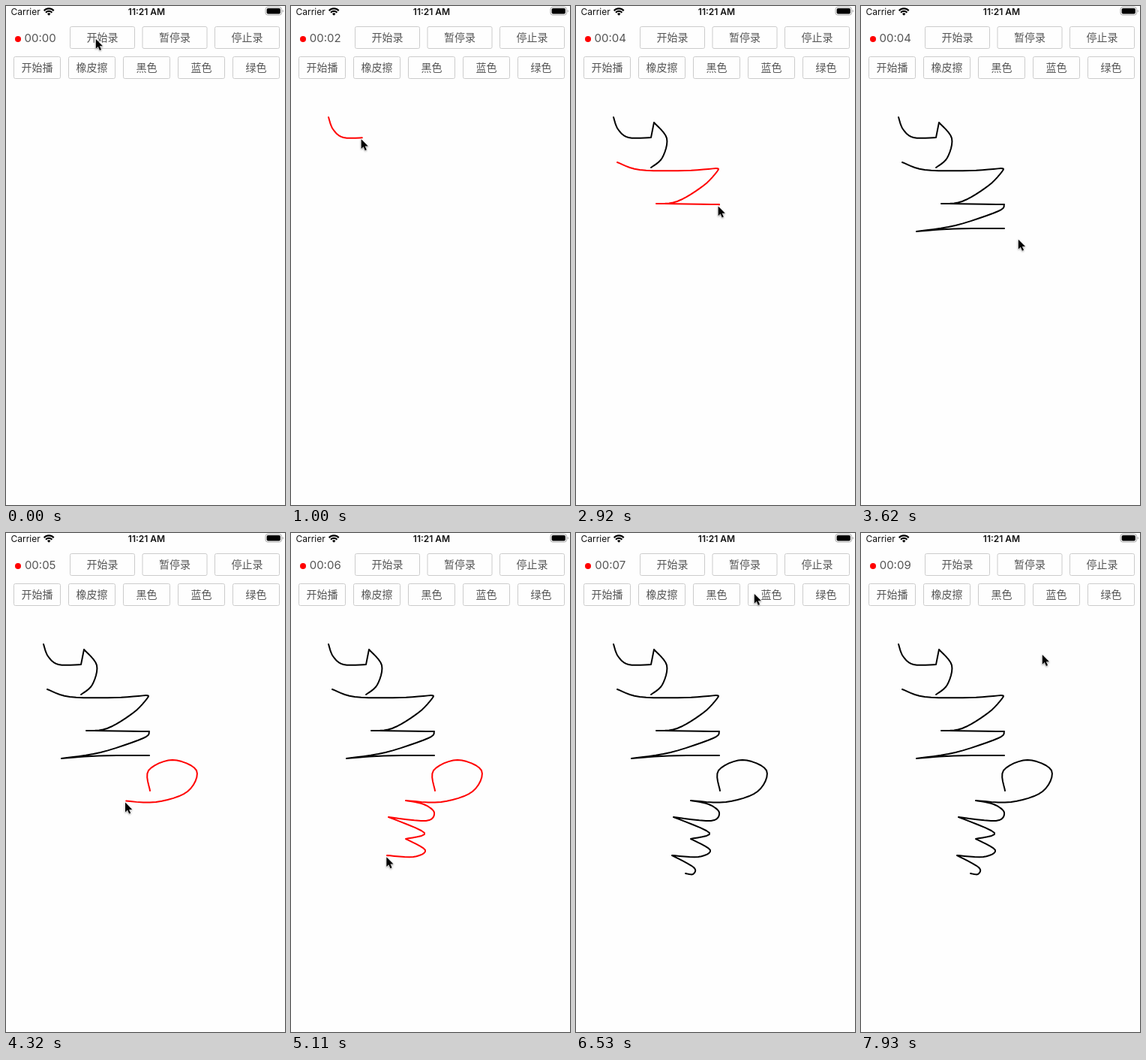
Recreate the animation shown at these times as an HTML page. Size 372x664 px, loop 7.99 s.

```html
<!DOCTYPE html>
<html lang="zh">
<head>
<meta charset="utf-8">
<style>
html, body { margin: 0; width: 100%; height: 100%; overflow: hidden; background: #fefefe; }
svg { display: block; width: 372px; height: 664px; }
text { font: 14px "Noto Sans CJK SC", "Noto Sans CJK", sans-serif; fill: #555; text-anchor: middle; }
.status { font: 12px Inter, sans-serif; fill: #111; }
#timer { font: 15px Inter, sans-serif; }
.btn rect { fill: #fefefe; stroke: #ccc; }
.ink { fill: none; stroke-width: 2; stroke-linejoin: round; stroke-linecap: round; }
#cursor { filter: drop-shadow(0 1px 1px #0006); }
</style>
</head>
<body>
<svg viewBox="0 0 372 664">
  <text class="status" x="6.5" y="11.5" style="text-anchor:start">Carrier</text>
  <text class="status" x="187.5" y="11.5" style="font-weight:600">11:21 AM</text>
  <g fill="none" stroke="#000" stroke-width="2.1">
    <path d="M50.7 6.2a9 9 0 0 1 13 0M53 8.7a5.8 5.8 0 0 1 8.4 0"/>
    <path d="M57.2 12.7l-2.2-2.3a3 3 0 0 1 4.4 0z" fill="#000" stroke="none"/>
  </g>
  <rect x="346" y="1.5" width="21.5" height="10.5" rx="3" fill="none" stroke="#aaa"/>
  <rect x="347.6" y="3" width="18.3" height="7.5" rx="1.8"/>
  <path d="M368.7 5v3.6q1.3-.5 1.3-1.8t-1.3-1.8" fill="#aaa"/>
  <circle cx="16" cy="44" r="4" fill="#f00"/>
  <text id="timer" x="45.7" y="47.8"></text>
  <g id="buttons"></g>
  <g id="inks"></g>
  <path id="cursor" d="M0 0V14.2l3.3-3.1 2.4 5.5 2.3-1-2.4-5.3h4.6z" stroke="#fff" paint-order="stroke"/>
</svg>
<script>
const LOOP = 7990;
const UP = -1;
const $ = id => document.getElementById(id);

function addRow(labels, left, top, width, step) {
  labels.forEach((label, i) => {
    const x = left + i * step;
    $('buttons').innerHTML += `<g class="btn"><rect x="${x}" y="${top}" width="${width}" height="29" rx="2"/>
      <text x="${x + width / 2}" y="${top + 19.8}">${label}</text></g>`;
  });
}
addRow(['开始录', '暂停录', '停止录'], 85.5, 27.5, 86, 96.5);
addRow(['开始播', '橡皮擦', '黑色', '蓝色', '绿色'], 10.5, 67.5, 62, 73);

// Catmull-Rom curve through a few key points
function smooth(keys) {
  const curve = [keys[0]];
  for (let i = 0; i < keys.length - 1; i++) {
    const [b, c] = [keys[i], keys[i + 1]];
    const [a, d] = [keys[i - 1] || b, keys[i + 2] || c];
    for (let u = 1 / 6; u < 1.01; u += 1 / 6) {
      curve.push(b.map((p, k) => p + u / 2 * (c[k] - a[k]
        + u * (2 * a[k] - 5 * p + 4 * c[k] - d[k] + u * (3 * (p - c[k]) + d[k] - a[k])))));
    }
  }
  return curve;
}

// A route is a chain of smooth curves; "|" marks a sharp corner
function route(text) {
  let corner = [];
  return text.split('|').flatMap(piece => {
    const keys = [...corner, ...piece.split(' ').map(p => p.split(',').map(Number))];
    corner = keys.slice(-1);
    return smooth(keys);
  });
}

// Pointer moves: start, end, ink index, route
const moves = [
  [340, 640, UP, '121,42 50,148'],
  [640, 1600, 0, '50,148 56,164 70,175 100,175|104,155|121,176 115,202 100,215'],
  [1620, 1960, UP, '100,215 55,208'],
  [2000, 2920, 1, '55,208 85,218 145,219 187,216|189,219 170,239 135,260 107,263|191,264'],
  [2920, 3400, 1, '191,264 183,273 126,292 74,300|124,296.5 191,296'],
  [3420, 3560, UP, '191,296 217,298'],
  [3590, 3720, UP, '217,298 192,343'],
  [3720, 5260, 2, '192,343 190,316 222,302 254,316 242,344 200,358 153,356'
    + '|177,361 191,372 180,383 130,378|178,399 153,407|179,422 163,431 128,429|157,445 156,454 146,453'],
  [5290, 6010, UP, '146,452 200,300 240,104'],
  [6190, 6450, UP, '240,104 239,79'],
  [6600, 6940, UP, '239,79 198,78'],
  [7230, 7930, UP, '198,78 225,183 243,160']
].map(([start, end, ink, text]) => ({ start, end, ink, points: route(text) }));

// Moments when the recording clock advances
const ticks = [110, 850, 1650, 2810, 3700, 4600, 5600, 6650, 7550];

const inks = [0, 1, 2].map(i => {
  const line = document.createElementNS('http://www.w3.org/2000/svg', 'polyline');
  line.setAttribute('class', 'ink');
  $('inks').append(line);
  return { line, end: Math.max(...moves.filter(m => m.ink === i).map(m => m.end)) };
});

// The leading part of a polyline, by share of its length
function partOf(points, share) {
  const lengths = points.slice(1).map(([x, y], i) => Math.hypot(x - points[i][0], y - points[i][1]));
  let left = share * lengths.reduce((a, b) => a + b);
  const part = [points[0]];
  for (let i = 0; i < lengths.length && left > 0; i++) {
    const k = Math.min(1, left / (lengths[i] || 1));
    part.push(points[i].map((v, axis) => v + (points[i + 1][axis] - v) * k));
    left -= lengths[i];
  }
  return part;
}

function draw(t) {
  let tip = moves[0].points[0];
  const drawn = [[], [], []];
  for (const { start, end, ink, points } of moves) {
    if (t < start) break;
    const part = partOf(points, Math.min(1, (t - start) / (end - start)));
    tip = part[part.length - 1];
    if (ink !== UP) drawn[ink].push(...part);
  }
  inks.forEach(({ line, end }, i) => {
    line.setAttribute('points', drawn[i].join(' '));
    line.style.stroke = t < end + 30 ? '#f00' : '#000';
  });
  $('cursor').setAttribute('transform', `translate(${tip[0] - 1.2} ${tip[1] + 2}) scale(.9)`);
  $('timer').textContent = '00:0' + ticks.filter(tick => t >= tick).length;
}

const origin = performance.now();
function frame() {
  draw((performance.now() - origin) % LOOP);
  requestAnimationFrame(frame);
}
frame();
</script>
</body>
</html>
```
